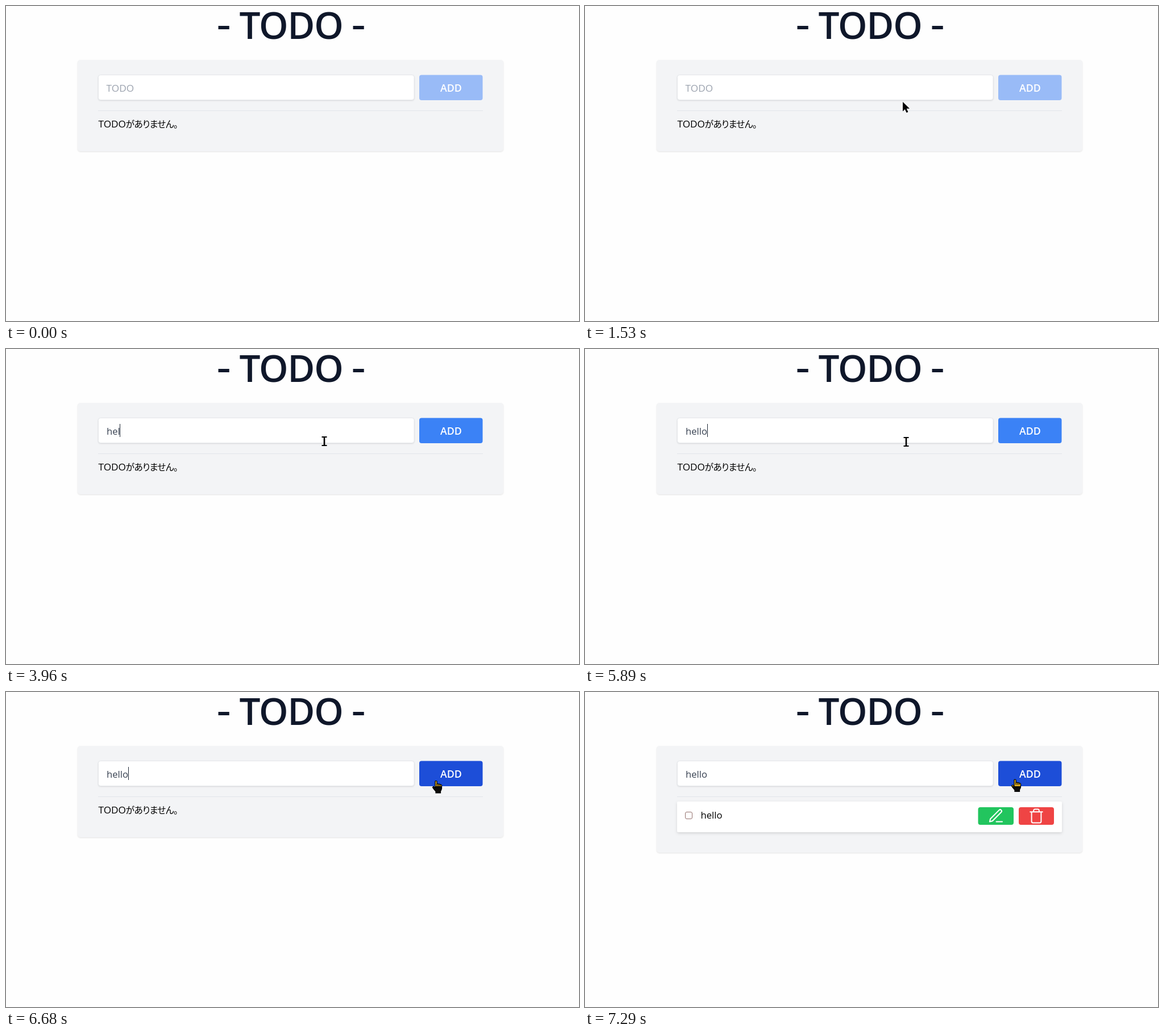
Recreate the animation shown at these times as an HTML page. Size 1008 by 555 pixels, loop 8 s.

```html
<!DOCTYPE html>
<html lang="ja">
<head>
<meta charset="utf-8">
<title>TODO</title>
<style>
  html, body { margin: 0; width: 100%; height: 100%; overflow: hidden; background: #fefefe; }
  svg { display: block; width: 1008px; height: 555px; }
  text { font: 400 17.2px "Open Sans", "Noto Sans", sans-serif; }
  .title { font-size: 65.5px; font-weight: 600; letter-spacing: -1.2px; fill: #0f172a; text-anchor: middle; }
  .dash { font-size: 80px; fill: #0f172a; text-anchor: middle; }
  .kana { font: 350 15.8px "Noto Sans CJK JP", "Noto Sans CJK", sans-serif; font-feature-settings: "palt"; letter-spacing: -.6px; }
  .hint { fill: #9ca3af; }
  .word { font-size: 16.65px; }
  .add { font-size: 17.8px; font-weight: 600; fill: #fff; text-anchor: middle; }
  .shade { filter: drop-shadow(0 1px 1px rgba(0, 0, 0, .11)); }
  .raised { filter: drop-shadow(0 2px 2.5px rgba(0, 0, 0, .13)); }
  .icon { fill: none; stroke: #fff; stroke-width: 1.65; stroke-linecap: round; stroke-linejoin: round; }
  .invert { fill: #fff; mix-blend-mode: difference; }
  .outline { fill: none; stroke: #000; stroke-width: 1.2; }
</style>
</head>
<body>
<svg viewBox="0 0 1008 555">
  <rect width="1008" height="555" fill="#fefefe"/>
  <text class="dash" x="383" y="60">-</text>
  <text class="title" x="501.5" y="57.7">TODO</text>
  <text class="dash" x="620" y="60">-</text>

  <rect id="card" class="shade" x="126" y="95" width="749" height="161" rx="5" fill="#f3f4f6"/>
  <rect class="shade" x="162.5" y="121.5" width="555.5" height="44" rx="4" fill="#fff" stroke="#e5e7eb"/>
  <text id="hint" class="hint" x="176.6" y="150.5">TODO</text>
  <text id="typed" class="word" x="177" y="150.5" fill="#374151"></text>
  <rect id="caret" y="132" width="1" height="23" fill="#1f2937"/>
  <rect id="button" x="727" y="121.5" width="111.5" height="44.5" rx="4"/>
  <text class="add" x="783" y="150.5">ADD</text>
  <rect x="162" y="184" width="677" height="1" fill="#e2e5ea"/>

  <g id="empty">
    <text x="162.5" y="213.5">TODO</text>
    <text class="kana" x="210.5" y="213.5">がありません。</text>
  </g>

  <g id="item">
    <rect class="raised" x="162" y="193" width="677" height="54" rx="2" fill="#fff"/>
    <rect x="176.5" y="211.5" width="12" height="12" rx="2.5" fill="#fff" stroke="#94706c"/>
    <text class="word" x="203.5" y="222.8">hello</text>
    <rect x="691.5" y="203" width="62.5" height="31" rx="4" fill="#22c55e"/>
    <rect x="763" y="203" width="62" height="31" rx="4" fill="#ef4444"/>
    <path class="icon" transform="translate(708.2 203.8) scale(1.23)"
      d="M12.5 20h8.5M16.5 3.5a2.12 2.12 0 0 1 3 3L7 19l-4 1 1-4z"/>
    <path class="icon" transform="translate(779.6 204) scale(1.2)"
      d="M3 6h18M19 6v14a2 2 0 0 1-2 2H7a2 2 0 0 1-2-2V6M8 6V4a2 2 0 0 1 2-2h4a2 2 0 0 1 2 2v2"/>
  </g>

  <path id="arrow" d="M0 0V16.5L3.8 12.9 6.6 19 9.4 17.8 6.7 11.8H12Z"/>
  <path id="beam" d="M-4.5-8.5H4.5V-6.5H1.3V6.5H4.5V8.5H-4.5V6.5H-1.3V-6.5H-4.5Z"/>
  <!-- The hand's inside inverts what lies under it -->
  <defs>
    <path id="palm" d="M-1.5 11V1.5Q-1.5 .5 0 .5 1.6 .5 1.6 1.5V6Q3 5 4.5 6.3 6 5.8 7 7 9 6.6 10 8.5V14Q9.5 17 8 18.5V22H-.5V19Q-4 15.5-6 12.2-5 9.8-3.3 10.8L-1.5 12.5Z"/>
  </defs>
  <g id="hand">
    <use href="#palm" class="invert"/>
    <use href="#palm" class="outline"/>
    <path class="outline" d="M1.6 6V10M4.5 6.3V10M7.2 7V10"/>
  </g>
</svg>
<script>
const LOOP = 8000;
const $ = id => document.getElementById(id);
const show = (id, on) => $(id).setAttribute("display", on ? "inline" : "none");

const BLINKS = [2080, 2600, 3140, 4960, 5430, 5960, 6490, 7020];
const KEYS = [3410, 3680, 3960, 4160, 4360];
const ADDED = 7210;
const passed = (times, t) => times.filter(at => at <= t).length;

const ENTER = [[616, 492], [608, 440], [606, 375], [597, 325], [590, 288], [588, 273]];
const APPROACH = [[587, 262], [580, 236], [571, 208], [563, 184], [559, 169], [560, 164], [560, 162.5]];

// Index of the pointer update between two times, in even steps
const stepAt = (t, from, to, count) =>
  Math.min(count - 1, Math.floor((t - from) / (to - from) * (count - 1) + 0.05));

function pointer(t) {
  if (t < 530) return null;
  if (t < 1260) return ENTER[stepAt(t, 530, 920, 6)];
  if (t < 5890) return APPROACH[stepAt(t, 1260, 1670, 7)];
  const p = stepAt(t, 5890, 6680, 13) / 12;
  const ease = p * p * (3 - 2 * p);
  const lift = t >= 6880 ? 2.5 : t >= 6820 ? 1 : 0;
  return [565 + 191.5 * ease, 163.5 - 7.5 * ease ** 2 - lift];
}

function kindAt([x, y]) {
  if (y < 121 || y > 166) return "arrow";
  if (x >= 162 && x <= 718) return "beam";
  return x >= 727 && x <= 839 ? "hand" : "arrow";
}

function render(t) {
  const count = passed(KEYS, t);
  const added = t >= ADDED;
  $("typed").textContent = "hello".slice(0, count);
  show("hint", count === 0);

  show("caret", passed(BLINKS, t) % 2 === 1);
  const width = count ? $("typed").getComputedTextLength() : 0;
  $("caret").setAttribute("x", Math.floor(177 + width));

  const at = pointer(t);
  const kind = at && kindAt(at);
  for (const id of ["arrow", "beam", "hand"]) show(id, id === kind);
  if (at) $(kind).setAttribute("transform", `translate(${at})`);

  $("button").setAttribute("fill", !count ? "#99bbf7" : kind === "hand" ? "#1d4ed8" : "#3b82f6");
  $("card").setAttribute("height", added ? 188 : 161);
  show("empty", !added);
  show("item", added);
}

const start = performance.now();
function tick() {
  render((performance.now() - start) % LOOP);
  requestAnimationFrame(tick);
}
tick();
</script>
</body>
</html>
```
